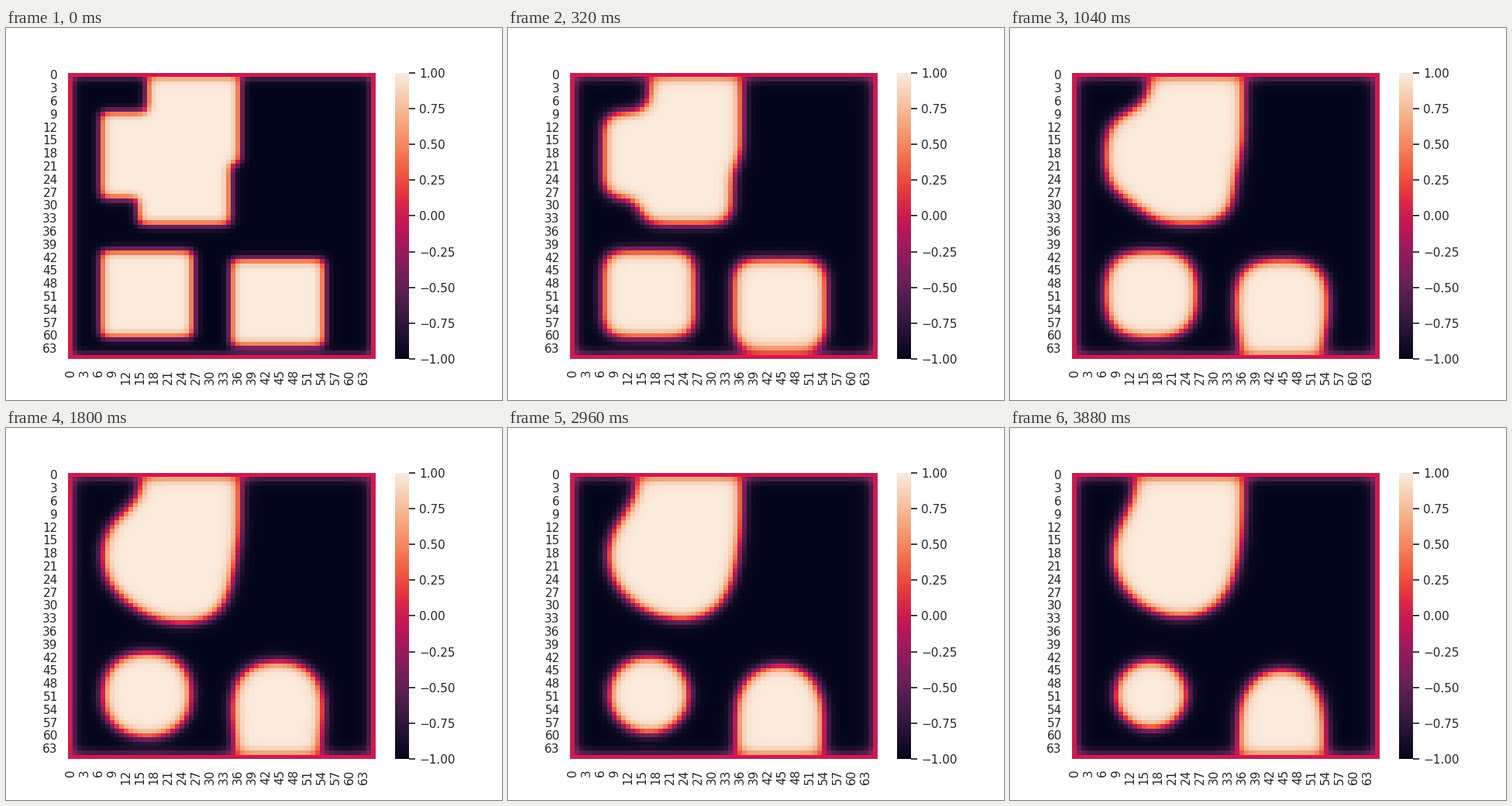
Recreate the animation shown at these times as a matplotlib script. Size 640x480 px, loop 4000 ms.

```python
import numpy as np
import matplotlib.pyplot as plt
from matplotlib.animation import FuncAnimation
from matplotlib.colors import LinearSegmentedColormap

N = 66          # grid cells per side, outer ring held at zero
SIDE = 20       # side of each starting square
CORNERS = [(1, 17), (9, 7), (15, 15), (41, 7), (43, 35)]   # row, column
FRAMES, INTERVAL = 100, 40
DT, STEPS, WARM_UP = 0.0925, 4, 8
INK = "#262626"

STOPS = [
    (0, "#03051a"), (1 / 7, "#35193e"), (1 / 6, "#3f1b43"), (1 / 5, "#4c1d4b"),
    (1 / 4, "#611f53"), (2 / 7, "#701f57"), (1 / 3, "#841e5a"),
    (2 / 5, "#a11a5b"), (3 / 7, "#ad1759"), (4 / 9, "#b91657"),
    (1 / 2, "#cb1b4f"), (4 / 7, "#e13342"), (3 / 5, "#e83f3f"),
    (2 / 3, "#f06043"), (5 / 7, "#f37651"), (3 / 4, "#f4875e"),
    (4 / 5, "#f69c73"), (5 / 6, "#f6aa82"), (6 / 7, "#f6b48f"),
    (1, "#faebdd"),
]


def start_field():
    u = np.zeros((N, N))
    u[1:-1, 1:-1] = -1
    for row, col in CORNERS:
        u[row:row + SIDE, col:col + SIDE] = 1
    return u


def evolve(u, steps):
    """Explicit Allen-Cahn steps with zero on the border."""
    u = u.copy()
    for _ in range(steps):
        c = u[1:-1, 1:-1]
        lap = u[:-2, 1:-1] + u[2:, 1:-1] + u[1:-1, :-2] + u[1:-1, 2:] - 4 * c
        u[1:-1, 1:-1] = c + DT * (lap + c - c**3)
    return u


fields = [evolve(start_field(), WARM_UP)]
while len(fields) < FRAMES:
    fields.append(evolve(fields[-1], STEPS))

plt.rcParams["font.family"] = "DejaVu Sans"
fig, ax = plt.subplots(figsize=(6.4, 4.8), dpi=100, facecolor="white")
fig.subplots_adjust(left=0.125, right=0.9, bottom=0.11, top=0.88)

rocket = LinearSegmentedColormap.from_list("rocket", STOPS, N=256)
mesh = ax.pcolormesh(fields[0], cmap=rocket, vmin=-1, vmax=1)
ax.set(xlim=(0, N), ylim=(N, 0))
ax.spines[:].set_visible(False)

labels = np.arange(0, N - 2, 3)
ax.set_xticks(labels + 0.5, labels, rotation=90)
ax.set_yticks(labels + 0.5, labels)
ax.tick_params(length=6, pad=3.5, left=False, bottom=False,
               labelsize=11, labelcolor=INK)

bar = fig.colorbar(mesh, ax=ax, ticks=np.linspace(-1, 1, 9))
bar.outline.set_linewidth(0)
bar.ax.tick_params(length=6, width=1.25, pad=3.5, labelsize=11,
                   color=INK, labelcolor=INK)


def draw(i):
    mesh.set_array(fields[i])
    return [mesh]


anim = FuncAnimation(fig, draw, frames=FRAMES, interval=INTERVAL,
                     init_func=lambda: draw(0), repeat=True, repeat_delay=0)
plt.show()
```
